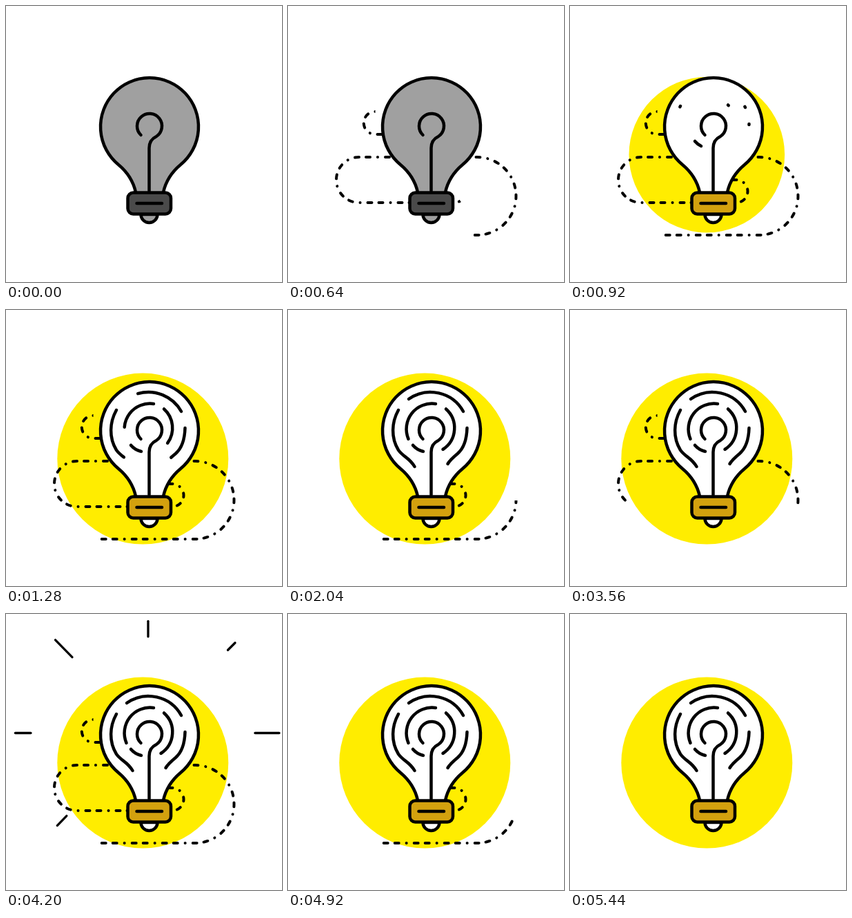
Recreate the animation shown at these times as an HTML page. Size 400 by 400 pixels, loop 5.84 s.

```html
<!DOCTYPE html>
<html lang="en">
<head>
<meta charset="utf-8">
<title>Light bulb</title>
<style>
  html, body { margin: 0; width: 100%; height: 100%; overflow: hidden; background: #fff; }
  svg { display: block; width: 100vw; height: 100vh; }
  path, line, rect { stroke: #000; stroke-width: 4.5; stroke-linecap: round; stroke-linejoin: round; }
  #trails > path { stroke-width: 4; stroke-dasharray: 0.1 10.9 6 10 6 11; }
  mask path { stroke: #fff; stroke-width: 12; stroke-linecap: butt; }
  #rays line { stroke-width: 3.3; }
</style>
</head>
<body>
<svg viewBox="0 0 400 400" fill="none">
  <defs id="defs"></defs>
  <circle id="glow" cx="198.3" cy="215.6" fill="#ffed00"/>
  <g id="trails"></g>
  <g id="rays"></g>
  <path class="glass" d="M195.5 302A12 12 0 0 0 219.500 302Z"/>
  <path class="glass" d="M188 270C184 252 175 240 163 230A71 71 0 1 1 253 230C241 240 232 252 228 270"/>
  <g id="maze"></g>
  <path d="M195.500 187A18 18 0 1 1 218 189Q207.500 194 207.500 206V268"/>
  <rect id="base" x="176.500" y="270.500" width="62.500" height="31" rx="8"/>
  <path d="M189.500 286H226"/>
</svg>
<script>
const LOOP = 5840, STEP = 40;
const $ = id => document.getElementById(id);

function add(parent, tag, attrs) {
  const el = document.createElementNS('http://www.w3.org/2000/svg', tag);
  for (const key in attrs) el.setAttribute(key, attrs[key]);
  return parent.appendChild(el);
}

const span = (t, from, to) => Math.min(1, Math.max(0, (t - from) / (to - from)));
const mix = (a, b, p) => a.map((v, i) => Math.round(v + (b[i] - v) * p));
const easeOut = p => 1 - (1 - p) ** 2;
const smooth = p => p * p * (3 - 2 * p);
const linear = p => p;
const lateRush = p => 0.55 * p + 0.45 * p ** 5;

// Dashed trails: draw and erase are the parts of each phase a trail takes up
const trails = [
  { d: 'M126.500 153A16.500 16.500 0 0 0 126 186H137', offset: 0, draw: [0, 0.2], erase: [0, 0.15], ease: linear },
  { d: 'M150 219H103A33 33 0 0 0 103 285H176', offset: 24, draw: [0.2, 0.75], erase: [0.15, 0.45], ease: linear },
  { d: 'M241 285A16.500 16.500 0 0 0 241 252H234', offset: 4, draw: [0.75, 1], erase: [0.6, 1], ease: linear },
  { d: 'M268 219H274A56.500 56.500 0 0 1 274 332H128', offset: 22.5, draw: [0, 1], erase: [0, 1], ease: lateRush }
];
trails.forEach((trail, i) => {
  const mask = add($('defs'), 'mask', { id: 'reveal' + i, maskUnits: 'userSpaceOnUse', x: 0, y: 0, width: 400, height: 400 });
  trail.reveal = add(mask, 'path', { d: trail.d, pathLength: 1 });
  add($('trails'), 'path', { d: trail.d, 'stroke-dashoffset': trail.offset, mask: `url(#reveal${i})` });
});

// Maze walls: path, start and end of drawing
const walls = [
  ['M254 147A54.500 54.500 0 0 0 175 129', 880, 1440],
  ['M160 145C150 163 149 185 160 203C167 213 176 214 183.500 227', 880, 1440],
  ['M259.500 171C259 188 255 200 246 208C240 213 235 217 231.500 223', 880, 1440],
  ['M214 136A37 37 0 0 0 174.500 187', 920, 1440],
  ['M229 143.500A37 37 0 0 1 224.500 202', 880, 1440],
  ['M181 196Q187 203 196 205', 800, 1000]
].map(([d, from, to]) => ({ from, to, el: add($('maze'), 'path', { d, pathLength: 1 }) }));

// Rays: two end points and the distance travelled
const rays = [
  [205.5, 37.5, 205.5, 60, 0.5, -29],
  [291.5, 86, 302, 75.5, 32, -36],
  [109, 76, 133.5, 101, -40, -41],
  [57.5, 172.5, 80, 172.5, -47, 0],
  [307.5, 172.5, 342.5, 172.5, 57, 0],
  [109, 270, 122.5, 256, -37, 39]
].map(([x1, y1, x2, y2, dx, dy]) => ({ dx, dy, el: add($('rays'), 'line', { x1, y1, x2, y2 }) }));
const bursts = [680, 1760, 2920, 4080, 5240];

function drawTrails(t) {
  const early = t < 2800;
  const drawn = early ? span(t, 40, 800) : span(t, 3160, 3920);
  const erased = early ? span(t, 1600, 2480) : span(t, 4400, 5280);
  for (const { reveal, draw, erase, ease } of trails) {
    const head = ease(span(drawn, ...draw));
    const tail = ease(span(erased, ...erase));
    reveal.style.display = head > tail ? '' : 'none';
    reveal.setAttribute('stroke-dasharray', `0 ${tail} ${head - tail} 2`);
  }
}

function drawRays(t) {
  const start = bursts.find(b => t >= b && t < b + 200);
  $('rays').style.display = start === undefined ? 'none' : '';
  if (start === undefined) return;
  const age = t - start, p = easeOut(span(age, 0, 160));
  $('rays').setAttribute('opacity', Math.min(1, (age + STEP) / 160));
  for (const { el, dx, dy } of rays) el.setAttribute('transform', `translate(${dx * p} ${dy * p})`);
}

function drawBulb(t) {
  const lit = span(t, 640, 800);
  const glass = `rgb(${mix([160, 160, 160], [255, 255, 255], lit)})`;
  document.querySelectorAll('.glass').forEach(el => el.setAttribute('fill', glass));
  $('base').setAttribute('fill', `rgb(${mix([74, 74, 74], [211, 161, 14], lit)})`);
  $('glow').setAttribute('r', 124 * easeOut(span(t, 640, 1040)));
  for (const { el, from, to } of walls) {
    const p = smooth(span(t, from, to));
    el.style.display = p > 0 ? '' : 'none';
    el.setAttribute('stroke-dasharray', `${p} 2`);
  }
}

const begin = performance.now();
function frame() {
  const t = Math.floor((performance.now() - begin) % LOOP / STEP) * STEP;
  drawTrails(t);
  drawRays(t);
  drawBulb(t);
  requestAnimationFrame(frame);
}
frame();
</script>
</body>
</html>
```
